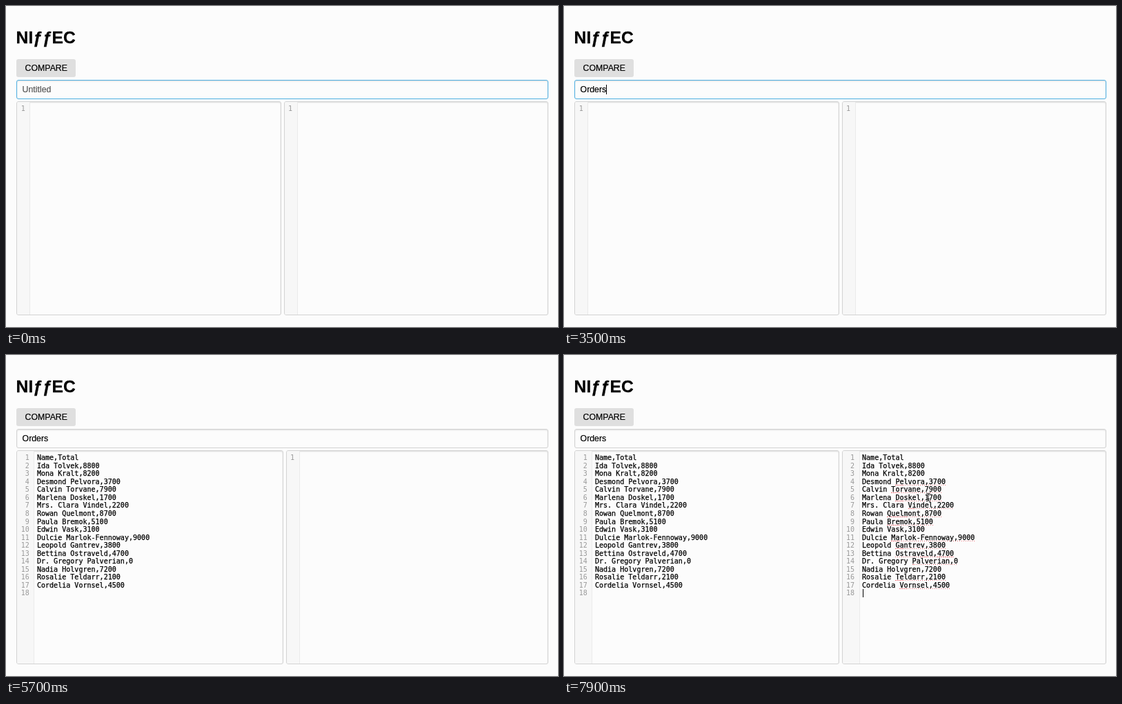
Recreate the animation shown at these times as an HTML page. Size 800 by 465 pixels, loop 8000 ms.

```html
<!DOCTYPE html>
<html lang="en">
<head>
<meta charset="utf-8">
<title>Text comparison</title>
<style>
html, body { margin: 0; width: 100%; height: 100%; overflow: hidden; background: #fcfcfc; }
body { position: relative; font: 12.32px/26px "Liberation Sans", Arial, sans-serif; color: #000; -webkit-text-stroke: .2px; }
body > *, .pane > *, .caret { position: absolute; box-sizing: border-box; }
h1 { left: 14.6px; top: 31px; margin: 0; font-size: 24.64px; line-height: 30px; -webkit-text-stroke: .3px; }
#button { left: 15.4px; top: 77px; width: 85.8px; height: 26px; border-radius: 3px; background: #dfdfdf; text-align: center; }
#field, .pane { border: 1px solid #d3d3d3; border-radius: 3px; box-shadow: inset 0 1px 2px rgba(0, 0, 0, .13); }
#field { left: 15.4px; top: 107px; width: 770.6px; height: 28px; padding-left: 7.2px; white-space: pre; }
#field.focus { border-color: #4fb0e2; }
#field .hint { color: #555; }
#field .caret { top: 6px; height: 14px; }
.pane { top: 138px; height: 310px; overflow: hidden; font: 10.06px/11.53px "DejaVu Sans Mono", monospace; white-space: pre; }
.gutter { left: 0; top: 0; bottom: 0; padding: 4.3px 6.5px 0 0; background: #f7f7f7; border-right: 1px solid #eaeaea; color: #999; text-align: right; -webkit-text-stroke: 0; }
.code { top: 4.3px; -webkit-text-stroke: .25px; }
.code u { text-decoration: none; background: repeating-linear-gradient(90deg, #f0757b 0 1.5px, transparent 1.5px 3px) 0 100% / 100% 1px no-repeat; }
.caret { width: 1px; height: 12px; background: #000; }
#pointer { left: 0; top: 0; width: 20px; height: 24px; overflow: visible; }
</style>
</head>
<body>
<h1>NIƒƒEC</h1>
<div id="button">COMPARE</div>
<div id="field"></div>
<div class="pane"></div>
<div class="pane"></div>
<svg id="pointer">
  <g id="beam" fill="none">
    <path d="M-3-6Q0-6 0-4Q0-6 3-6M0-4V4M-3 6Q0 6 0 4Q0 6 3 6M-1.8 2.5H1.8" stroke="#fff" stroke-width="2.2" opacity=".7"/>
    <path d="M-3-6Q0-6 0-4Q0-6 3-6M0-4V4M-3 6Q0 6 0 4Q0 6 3 6M-1.8 2.5H1.8" stroke="#000" stroke-width=".9"/>
  </g>
  <path id="arrow" d="M-3-7V5.5L0 2.8L2 7.2L4 6.3L2.1 2H6Z" fill="#000" stroke="#fff"/>
</svg>
<script>
const LOOP = 8000, STEP = 100, LINE = 11.53;
const rows = `Name,Total
Ida Tolvek,8800
Mona Kralt,8200
Desmond *Pelvora,3700
Calvin *Torvane,7900
Marlena *Doskel,1700
Mrs. Clara *Vindel,2200
Rowan *Quelmont,8700
Paula *Bremok,5100
Edwin Vask,3100
Dulcie *Marlok-Fennoway,9000
Leopold *Gantrev,3800
Bettina *Ostraveld,4700
Dr. Gregory *Palverian,0
Nadia Holvgren,7200
Rosalie *Teldarr,2100
Cordelia *Vornsel,4500`;
const plain = rows.replace(/\*/g, '');
const marked = rows.replace(/\*(.+)/g, '<u>$1</u>'); // spell-checked words
const numbers = Array.from({ length: 18 }, (_, i) => i + 1).join('\n');

const typedAt = [2600, 2900, 3100, 3200, 3300, 3500];
const fieldCaret = [[400, 900], [1000, 1500], [2000, 2500], [2600, 3800]];
const leftCaret = [[3800, 4300], [4400, 4900]];
const rightCaret = [[5200, 5700], [5900, 6300], [6800, 7300], [7800, 8000]];
// pointer paths: time, x, y
const paths = [
  [[200, 425, 286], [500, 345, 178], [800, 299, 127], [1000, 304, 62], [1400, 322, 54], [1800, 335, 51]],
  [[6800, 631, 37], [6900, 616, 95], [7000, 596, 142], [7100, 582, 164], [7600, 547, 196], [7900, 528, 206], [8000, 528, 206]]
];

const $ = id => document.getElementById(id);
const panes = document.querySelectorAll('.pane');
const within = (spans, t) => spans.some(([a, b]) => t >= a && t < b);
const caret = (on, style = '') => on ? `<i class="caret" style="${style}"></i>` : '';

function setHTML(el, html) {
  if (el.shown !== html) el.innerHTML = el.shown = html;
}

function drawField(t) {
  const text = 'Orders'.slice(0, typedAt.filter(at => t >= at).length);
  const bar = caret(within(fieldCaret, t));
  $('field').className = t < 3800 ? 'focus' : '';
  setHTML($('field'), text ? text + bar : bar + '<span class="hint">Untitled</span>');
}

function drawPane(el, left, right, full, text, caretOn) {
  el.style.left = left + 'px';
  el.style.width = right - left + 'px';
  const bar = caret(caretOn, `left:.6px;top:${full ? 17 * LINE : 0}px`);
  setHTML(el, `<div class="gutter" style="width:${full ? 25 : 19}px">${full ? numbers : 1}</div>` +
    `<div class="code" style="left:${full ? 28.5 : 23}px">${full ? text : ''}${bar}</div>`);
}

function drawPointer(t) {
  const path = paths.find(p => t >= p[0][0] && t < p[p.length - 1][0]);
  $('pointer').style.display = path ? '' : 'none';
  if (!path) return;
  const i = path.findIndex(p => p[0] > t), a = path[i - 1], b = path[i];
  const k = (t - a[0]) / (b[0] - a[0]);
  const x = a[1] + (b[1] - a[1]) * k, y = a[2] + (b[2] - a[2]) * k;
  $('pointer').style.transform = `translate(${x}px,${y}px)`;
  $('beam').style.display = y > 107 ? '' : 'none';
  $('arrow').style.display = y > 107 ? 'none' : '';
}

function draw(now) {
  const t = Math.floor(now % LOOP / STEP) * STEP;
  const leftFull = t >= 4400, rightFull = t >= 5900;
  const shift = leftFull && !rightFull ? 3 : 0;
  drawField(t);
  drawPane(panes[0], 15.4, 399 + shift, leftFull, plain, within(leftCaret, t));
  drawPane(panes[1], 402.5 + shift, 786, rightFull, marked, within(rightCaret, t));
  drawPointer(t);
}

const start = performance.now();
function tick() {
  draw(performance.now() - start);
  requestAnimationFrame(tick);
}
tick();
</script>
</body>
</html>
```
